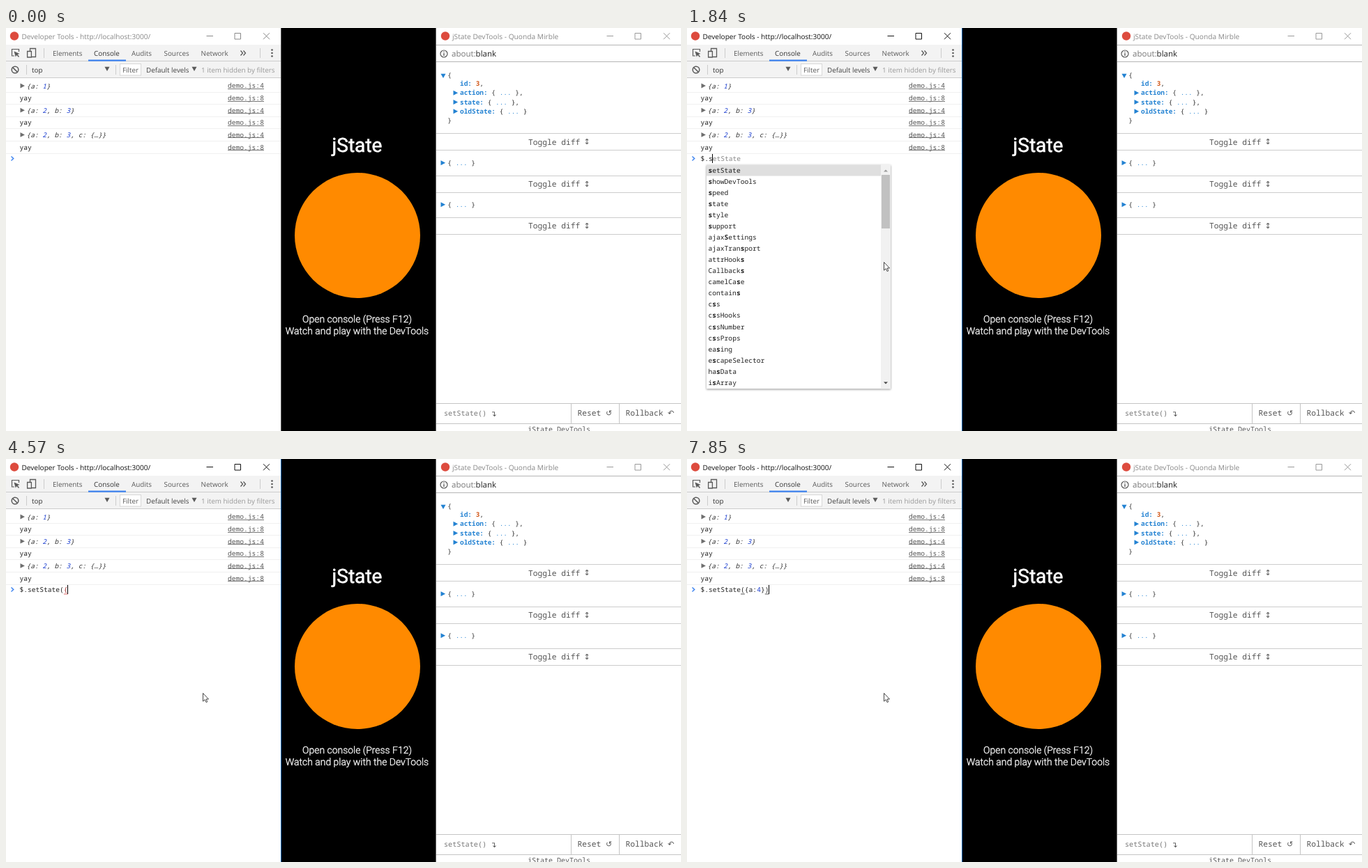
An HTML page that plays this animation: 968 by 579 pixels, repeating every 8000 ms.

```html
<!DOCTYPE html>
<html lang="en">
<head>
<meta charset="utf-8">
<title>State console demo</title>
<style>
html, body { margin: 0; width: 100%; height: 100%; overflow: hidden; background: #fff; }
svg { display: block; width: 968px; height: 579px; }
text { white-space: pre; text-rendering: geometricPrecision; }
.ui { font: 9.85px "Open Sans", "Noto Sans", sans-serif; fill: #5a5a5a; }
.mono { font: 9.617px "Noto Sans Mono", monospace; fill: #222; }
.json { font: 9.45px "Noto Sans Mono", monospace; fill: #333; }
.btn { font: 11.25px "Noto Sans Mono", monospace; fill: #555; }
.sym { font: 11px "DejaVu Sans", sans-serif; fill: #555; }
.page { font: 300 13.95px Roboto, sans-serif; fill: #fff; stroke: #fff; stroke-width: .35px; text-anchor: middle; }
.b { font-weight: 700; }
.obj { font-size: 9.5px; font-style: italic; fill: #333; }
.key { fill: #2382d2; font-weight: 600; }
.blue { fill: #2382d2; }
.num { fill: #1c3fd0; }
.popup { filter: drop-shadow(0 1px 1.5px rgba(0, 0, 0, .45)); }
</style>
</head>
<body>
<svg id="stage" viewBox="0 0 968 579">
  <g id="fixed"></g>
  <g id="focus"></g>
  <g id="prompt"></g>
  <path id="mouse" d="M0 0V11.6L2.7 9.2L4.6 13.1L6.3 12.3L4.5 8.5H8Z" fill="#fff" stroke="#333" stroke-width=".9"/>
</svg>
<script>
const LOOP = 8000, PITCH = 5.77, LEFT = 19.4, ROW = 16.05;
const $ = id => document.getElementById(id);

const text = (x, y, s, cls = 'ui', more = '') => `<text x="${x}" y="${y}" class="${cls}" ${more}>${s}</text>`;
const rect = (x, y, w, h, fill, more = '') => `<rect x="${x}" y="${y}" width="${w}" height="${h}" fill="${fill}" ${more}/>`;
const line = (d, color, w = 1) => `<path d="${d}" fill="none" stroke="${color}" stroke-width="${w}"/>`;
const fill = (d, color) => `<path d="${d}" fill="${color}"/>`;
const disc = (x, y, r, color) => `<circle cx="${x}" cy="${y}" r="${r}" fill="${color}"/>`;
const ring = (x, y, r, color, w = 1.2) => `<circle cx="${x}" cy="${y}" r="${r}" fill="none" stroke="${color}" stroke-width="${w}"/>`;
const span = (cls, s) => `<tspan class="${cls}">${s}</tspan>`;
const right = (x, y, color, s = 3.5) => fill(`M${x} ${y - s}V${y + s}L${x + s * 1.9} ${y}Z`, color);
const down = (x, y, color, s = 3.5) => fill(`M${x - s} ${y - s * .8}H${x + s}L${x} ${y + s}Z`, color);
const up = (x, y, color, s = 3) => fill(`M${x - s} ${y + s / 2}H${x + s}L${x} ${y - s / 2}Z`, color);
const chevron = (x, y) => line(`M${x} ${y - 3}L${x + 3.2} ${y}L${x} ${y + 3}`, '#3b82f0', 1.4);

const windowButtons = (x, y, color) =>
  line(`M${x} ${y}h9.5M${x + 40.5} ${y - 4}h8.5v8.5h-8.5zM${x + 81.5} ${y - 4.3}l9 9m0 -9l-9 9`, color);

function devtools() {
  let s = rect(0, 0, 394, 579, '#fff') + disc(12, 11.5, 6.2, '#dd4b3e');
  s += rect(0, 24, 394, 47.5, '#f3f3f3') + line('M0 47.5H394M0 71.5H394', '#ccc');
  // inspect and device icons
  s += line('M12 40H8.5V30.5H18.5V34', '#5a5a5a', 1.2) + fill('M11.5 33.5L19.5 37L16.5 38L19 41L18 42L15.3 39L13.8 41.5Z', '#5a5a5a');
  s += line('M34.5 33V29.5H42.5V41.5H37M30.6 33.5H36.4V42H30.6Z', '#5a5a5a', 1.3);
  s += line('M54.5 29V43M364.5 29V43M29.5 53V67M157.5 53V67', '#ccc');
  [['Elements', 67], ['Console', 126], ['Audits', 180], ['Sources', 226.5], ['Network', 279.5]]
    .forEach(([name, x]) => s += text(x, 39.6, name, 'ui', name === 'Console' ? 'style="fill:#333"' : ''));
  s += rect(118, 45.5, 54, 2.2, '#3b82f0');
  s += line('M336.5 32.5L339.5 36L336.5 39.5M340.5 32.5L343.5 36L340.5 39.5', '#5a5a5a', 1.3);
  s += [31.5, 36, 40.5].map(y => disc(381.5, y, 1.35, '#5a5a5a')).join('');
  s += ring(13, 60, 4.8, '#5a5a5a', 1.5) + line('M9.6 56.6L16.4 63.4', '#5a5a5a', 1.5);
  s += text(37, 63.5, 'top', 'ui', 'style="fill:#333"') + down(145, 58.5, '#5a5a5a');
  s += rect(163.5, 51.5, 30, 16.5, '#fff', 'stroke="#d8d8d8"') + text(167, 63.5, 'Filter');
  s += text(201, 63.5, 'Default levels', 'ui', 'style="fill:#444"') + down(270, 58.5, '#5a5a5a');
  s += text(280, 63.5, '1 item hidden by filters', 'ui', 'style="fill:#999"');

  const n = v => span('num', v);
  [`{a: ${n(1)}}`, `{a: ${n(2)}, b: ${n(3)}}`, `{a: ${n(2)}, b: ${n(3)}, c: {…}}`].forEach((obj, k) => {
    const y = 83 + k * 35.2;
    s += right(20.5, y, '#6e6e6e', 3.4) + text(29.5, y + 3.5, obj, 'mono obj') + text(LEFT, y + 21.2, 'yay', 'mono');
    [[0, 4], [17.7, 8]].forEach(([dy, row]) => {
      s += text(318, y + dy + 3.4, 'demo.js:' + row, 'mono', 'style="fill:#555"');
      s += line(`M318 ${Math.round(y + dy + 4) + .5}H370`, '#777');
      s += line(`M0 ${Math.round(y + dy + 8.5) + .5}H394`, '#f0f0f0');
    });
  });
  return s + chevron(7.5, 187.5);
}

function page() {
  return rect(394, 0, 223, 579, '#000')
    + text(503.5, 178, 'jState', 'page', 'style="font-size:28.1px;font-weight:400;stroke-width:.6px"')
    + disc(504, 298, 90, '#ff8a00')
    + text(503.5, 423, 'Open console (Press F12)', 'page')
    + text(503.5, 440, 'Watch and play with the DevTools', 'page');
}

function inspector() {
  let s = rect(616, 0, 352, 579, '#fff') + rect(616, 0, 1, 579, '#666') + disc(630, 11.5, 6.2, '#dd4b3e');
  s += text(640, 15.5, 'jState DevTools - Quonda Mirble', 'ui', 'style="font-size:10.2px;fill:#888"');
  s += windowButtons(861.5, 11.5, '#999') + line('M617 24.5H968M617 48.5H968', '#b5b5b5');
  s += ring(628, 37, 5, '#555') + line('M628 36V40M628 33.8V35', '#555', 1.3);
  s += text(639, 41, 'about:<tspan fill="#222">blank</tspan>', 'ui', 'style="font-size:11.5px;fill:#777"');

  const folded = `{ ${span('blue', '...')} }`;
  s += down(627, 68.5, '#2382d2') + text(633.3, 70.5, '{', 'json') + text(633.3, 136.2, '}', 'json');
  s += text(651, 83.3, `${span('key', 'id:')} <tspan fill="#d2591b" font-weight="600">3</tspan>,`, 'json');
  ['action', 'state', 'oldState'].forEach((key, k) => {
    const y = 93.3 + k * 13.2;
    s += right(641.5, y, '#2382d2') + text(651, y + 3.1, `${span('key', key + ':')} ${folded}${k < 2 ? ',' : ''}`, 'json');
  });
  [193.7, 253.7].forEach(y => s += right(623.5, y, '#2382d2') + text(633.3, y + 3.4, folded, 'json'));
  [163.5, 224, 284].forEach(y => {
    const top = Math.floor(y - 12) + .5, end = Math.floor(y + 12) + .5;
    s += line(`M617 ${top}H968M617 ${end}H968`, '#ccc');
    s += text(749, y + 4, 'Toggle diff', 'btn') + text(833, y + 3.7, '↕', 'sym', 'text-anchor="middle"');
  });

  s += line('M617 539.5H968M617 568.5H968M810.5 540V568M879.5 540V568', '#c4c4c4');
  s += text(628, 557, 'setState()', 'btn', 'style="font-size:10.2px;fill:#777"') + text(694.5, 557.5, '↴', 'sym');
  s += text(819.5, 557.3, 'Reset', 'btn') + text(860, 557.2, '↺', 'sym');
  s += text(888.5, 557.3, 'Rollback', 'btn') + text(949, 557.2, '↶', 'sym');
  return s + text(748, 579.8, 'jState DevTools', 'btn', 'style="font-size:10px"');
}

// Bold the letters of the query in the order they occur.
function highlight(word, query) {
  let k = 0;
  return [...word].map(c =>
    k < query.length && c.toLowerCase() === query[k] ? (k++, span('b', c)) : c).join('');
}

const popups = [
  { x: 16, w: 265, thumb: 136, query: '$', note: 'Window', past: 4, items: ['$', '$', '$$', '$x',
    '$.setState({a:11})', '$.getJSON', '$', '$.setState({todos: [{a:11}]})', '$.register(logger)', '$._.todos',
    '$._.todos.push({a:11})', '$.setState({todos: []})', '$._.todos.push({a:11},{a:12})', "$._.todos = 'asdsa'",
    '$._', '$.setState({todos: a})', '$.setState({todos: [{text: "yayayya", co…', '$.setState({a: 5})',
    "$.setState({a:'dsfdsf'})", '$.setState({a:111})'] },
  { x: 28, w: 264, thumb: 77, query: 's', items: `setState showDevTools speed state style support ajaxSettings
    ajaxTransport attrHooks Callbacks camelCase contains css cssHooks cssNumber cssProps easing escapeSelector
    hasData isArray`.split(/\s+/) },
  { x: 28, w: 264, thumb: 200, query: 'se', items: `setState showDevTools speed state style ajaxSettings ajaxSetup
    camelCase cssNumber escapeSelector isEmptyObject isNumeric isPlainObject isReady parseHTML parseJSON parseXML
    hasOwnProperty isPrototypeOf propertyIsEnumerable`.split(/\s+/) },
  { x: 86, w: 117, query: 'a', items: `a alert atob addEventListener applicationCache AnalyserNode AnimationEvent
    Array ArrayBuffer Attr Audio AudioBuffer AudioContext`.split(/\s+/) }
];

function popup({ x, w, thumb, query, note, past = 99, items }) {
  const h = items.length * ROW + .8, inner = w - (thumb ? 14 : 0);
  let s = rect(x, 196.5, w, h, '#fff', 'class="popup"');
  if (past < items.length) s += rect(x, 196.5 + past * ROW, inner, h - past * ROW, '#f8f8f8');
  s += rect(x, 196.5, inner, ROW, '#dfdfdf');
  items.forEach((item, k) => {
    const y = 204.5 + k * ROW, old = k >= past;
    if (old) s += chevron(x + 5, y);
    s += text(x + (old ? 11 : 2.5), y + 3.3, highlight(item, query), 'mono');
  });
  if (note) s += text(x + inner - 4, 207.8, note, 'mono', 'text-anchor="end" style="fill:#666"');
  if (thumb) {
    const bar = x + inner;
    s += rect(bar, 196.5, 14, h, '#f1f1f1') + rect(bar + 1, 211, 12, thumb, '#c1c1c1');
    s += up(bar + 7, 205, '#999') + fill(`M${bar + 4} 508.5h6l-3 3z`, '#444');
  }
  return s;
}

const CALL = '$.setState({a:4})';
// time, typed characters, caret, popup, marked brackets
const steps = [
  [0, 0, 0], [445, 0, 1], [980, 0, 0], [1210, 1, 1, 0], [1690, 2, 1],
  [1840, 3, 1, 1], [1990, 4, 1, 1], [2070, 4, 1, 2], [2530, 4, 0, 2],
  [2620, 10, 1], [3170, 10, 0], [3320, 11, 1, null, [10]], [3870, 11, 0, null, [10]],
  [4420, 11, 1, null, [10]], [4570, 12, 1, null, [11]], [4880, 13, 1, 3], [5430, 13, 0, 3],
  [5730, 14, 1], [6130, 15, 1], [6680, 15, 0],
  [6980, 16, 1, null, [11, 15]], [7530, 16, 0, null, [11, 15]], [7850, 17, 1, null, [10, 16]]
];

function prompt([, count, caret, list, marks = []]) {
  const lone = marks.length === 1;
  let s = '';
  const typed = [...CALL.slice(0, count)].map((c, k) =>
    c === '4' ? span('num', c) : lone && marks[0] === k ? `<tspan fill="#a33">${c}</tspan>` : c).join('');
  const ghost = list === 1 || list === 2 ? `<tspan fill="#888">${CALL.slice(count, 10)}</tspan>` : '';
  s += text(LEFT, 191, typed + ghost, 'mono');
  marks.forEach(k => s += rect(LEFT + k * PITCH, 193.5, PITCH, 1, lone ? '#d66' : '#555'));
  if (caret) s += rect(Math.floor(19.6 + count * PITCH), 181, 1, 13, '#000');
  if (list != null) s += popup(popups[list]);
  return s;
}

function titleBar(active) {
  const color = active ? '#111' : '#888';
  return text(22.5, 15.5, 'Developer Tools - http://localhost:3000/', 'ui', `style="font-size:10.08px;fill:${color}"`)
    + windowButtons(287.5, 11.5, color)
    + rect(394, 0, 1, 579, active ? '#1068b0' : '#555');
}

function moveMouse(t) {
  const k = Math.min(6, Math.floor((t - 70) / 75)), left = (1 - k / 6) ** 2;
  $('mouse').setAttribute('visibility', t < 70 ? 'hidden' : 'visible');
  $('mouse').setAttribute('transform', `translate(${282.5 + 260 * left} ${336.5 - 14 * left})`);
}

$('fixed').innerHTML = devtools() + page() + inspector();
let shown = -1;

function draw(t) {
  const now = steps.findLastIndex(step => step[0] <= t);
  if (now !== shown) {
    shown = now;
    $('focus').innerHTML = titleBar(now > 0);
    $('prompt').innerHTML = prompt(steps[now]);
  }
  moveMouse(t);
}

const start = performance.now();
function tick() {
  draw((performance.now() - start) % LOOP);
  requestAnimationFrame(tick);
}
tick();
</script>
</body>
</html>
```
